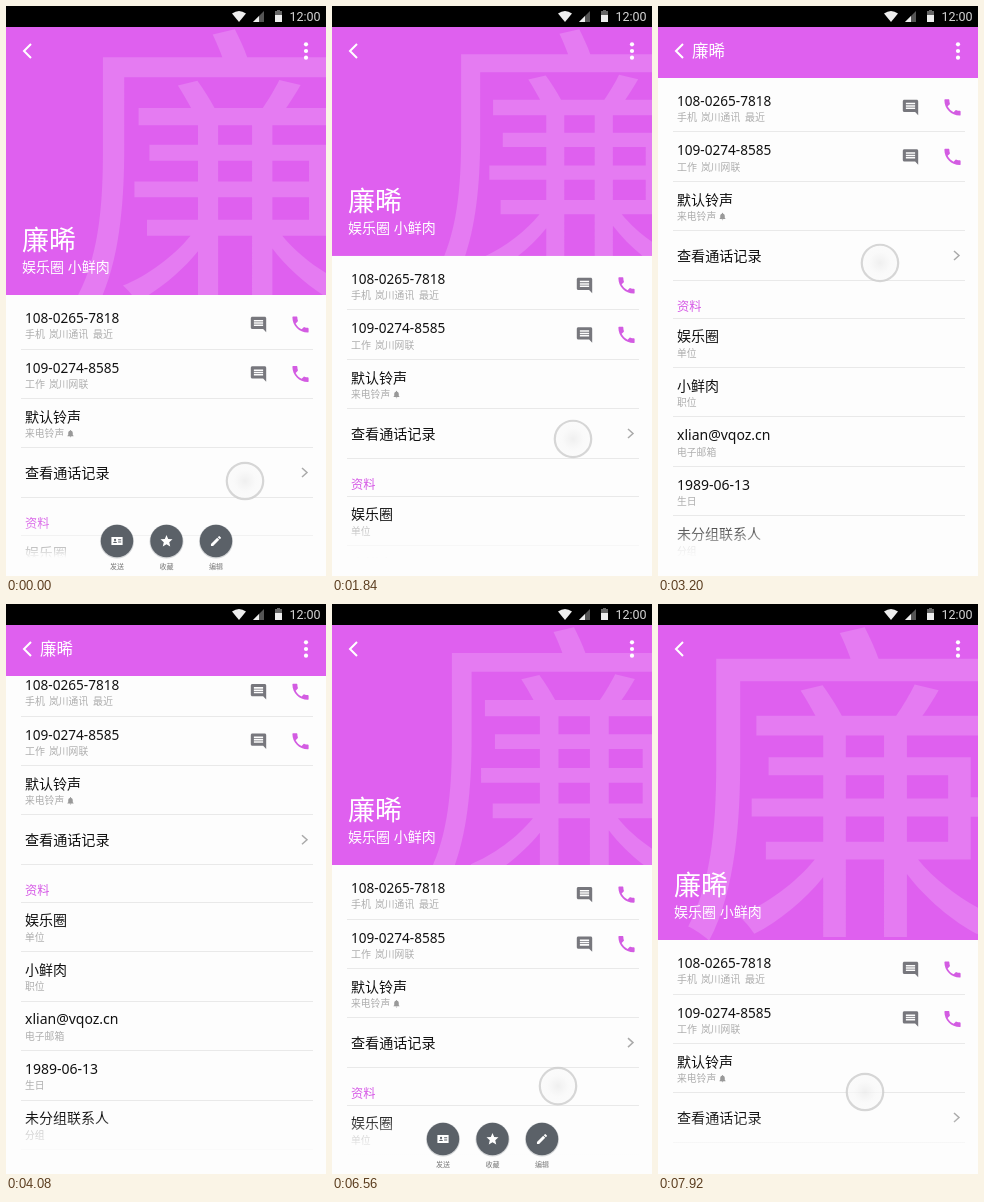
An HTML page with a canvas that plays this animation: 320 by 570 pixels, repeating every 8 s.

```html
<!DOCTYPE html>
<html lang="zh-CN">
<head>
<meta charset="utf-8">
<title>联系人</title>
<style>
html, body { margin: 0; width: 100%; height: 100%; overflow: hidden; background: #fdfdfd; }
canvas { display: block; width: 320px; height: 570px; }
</style>
</head>
<body>
<canvas id="stage"></canvas>
<script>
const W = 320, H = 570, LOOP = 8000;
const PINK = '#df60ef', GREY = '#adadad', INK = '#111';
const FONT = '"Noto Sans", "Noto Sans CJK SC", sans-serif';
const CJK = '"Noto Sans CJK SC", "Noto Sans CJK", sans-serif';

const canvas = document.getElementById('stage');
const ctx = canvas.getContext('2d');
const dpr = window.devicePixelRatio || 1;
canvas.width = W * dpr;
canvas.height = H * dpr;

const clamp = v => Math.max(0, Math.min(1, v));
const ramp = (v, a, b) => clamp((v - a) / (b - a));
const mix = (a, b, p) => a + (b - a) * p;
const smooth = p => p * p * (3 - 2 * p);

// Smooth monotone curve through [time, value] points
function track(keys) {
  const n = keys.length - 1, d = [];
  for (let i = 0; i < n; i++) d.push((keys[i + 1][1] - keys[i][1]) / (keys[i + 1][0] - keys[i][0]));
  const m = keys.map((k, i) => {
    if (i === 0 || i === n || d[i - 1] * d[i] <= 0) return 0;
    return 2 * d[i - 1] * d[i] / (d[i - 1] + d[i]);
  });
  return t => {
    if (t <= keys[0][0]) return keys[0][1];
    if (t >= keys[n][0]) return keys[n][1];
    let i = 0;
    while (t > keys[i + 1][0]) i++;
    const h = keys[i + 1][0] - keys[i][0], u = (t - keys[i][0]) / h, s = smooth(u);
    return mix(keys[i][1], keys[i + 1][1], s) +
      h * u * (1 - u) * ((1 - u) * m[i] - u * m[i + 1]);
  };
}

const edgeAt = track([[1040, 289], [1840, 250], [2400, 199], [3200, 72], [3600, 61], [4240, 58],
  [5200, 58], [5520, 85], [6560, 261], [6880, 289], [7280, 289], [7920, 336]]);

const touches = [
  { from: -500, to: 3900, fade: 260,
    x: track([[1040, 239], [1840, 241], [2400, 241], [3200, 222], [3700, 212]]),
    y: track([[1040, 475], [1840, 433], [2400, 382], [3200, 257], [3700, 238]]) },
  { from: 4380, to: 6880, fade: 160,
    x: track([[5520, 212], [6560, 226], [6880, 229]]),
    y: track([[5200, 259], [5520, 289], [6560, 482], [6880, 512]]) },
  { from: 7260, to: 9000, fade: 160,
    x: () => 207,
    y: track([[7280, 428], [7920, 488]]) }
];

const icons = {
  note: new Path2D('M22 4c0-1.1-.9-2-2-2H4c-1.1 0-2 .9-2 2v12c0 1.1.9 2 2 2h14l4 4zM18 14H6v-2h12zM18 11H6V9h12zM18 8H6V6h12z'),
  call: new Path2D('M6.6 10.8c1.4 2.8 3.8 5.1 6.6 6.6l2.2-2.2c.3-.3.7-.4 1-.2 1.1.4 2.3.6 3.6.6.6 0 1 .4 1 1V20c0 .6-.4 1-1 1C10.600 21 3 13.400 3 4c0-.6.5-1 1-1h3.500c.6 0 1 .5 1 1 0 1.300.2 2.500.6 3.600.1.3 0 .7-.3 1z'),
  bell: new Path2D('M12 22a2 2 0 0 0 2-2h-4a2 2 0 0 0 2 2zM18 16v-5c0-3-1.600-5.600-4.500-6.300V4a1.500 1.500 0 0 0-3 0v.7C7.600 5.400 6 8 6 11v5l-2 2v1h16v-1z'),
  card: new Path2D('M2 5h20v14H2zM5 15.500h7c0-3-7-3-7 0zM8.500 8a2 2 0 1 0 0 4a2 2 0 1 0 0-4zM14 9h5.500v1.800H14zM14 13h5.500v1.800H14z'),
  star: new Path2D('M12 17.300 18.200 21l-1.600-7L22 9.200l-7.200-.6L12 2 9.200 8.600 2 9.200 7.500 14l-1.700 7z'),
  pen: new Path2D('M3 17.200V21h3.800L17.800 9.900l-3.700-3.700zM20.700 7a1 1 0 0 0 0-1.400l-2.300-2.300a1 1 0 0 0-1.400 0l-1.800 1.800 3.700 3.700z')
};

function icon(name, x, y, scale, color) {
  ctx.save();
  ctx.translate(x, y);
  ctx.scale(scale, scale);
  ctx.translate(-12, -12);
  ctx.fillStyle = color;
  ctx.fill(icons[name], 'evenodd');
  ctx.restore();
}

// Text placed by its visual middle
function text(s, x, y, size, color, weight = 400, font = FONT) {
  ctx.font = `${weight} ${size}px ${font}`;
  ctx.fillStyle = color;
  ctx.fillText(s, x, y + size * 0.37);
}

function rect(x, y, w, h, color) {
  ctx.fillStyle = color;
  ctx.fillRect(x, y, w, h);
}

function disc(x, y, r, color) {
  ctx.fillStyle = color;
  ctx.beginPath();
  ctx.arc(x, y, r, 0, 7);
  ctx.fill();
}

function poly(points, color) {
  ctx.fillStyle = color;
  ctx.beginPath();
  points.forEach(p => ctx.lineTo(...p));
  ctx.fill();
}

function chevron(x, y, w, h, color, width) {
  ctx.strokeStyle = color;
  ctx.lineWidth = width;
  ctx.beginPath();
  ctx.moveTo(x - w, y - h);
  ctx.lineTo(x, y);
  ctx.lineTo(x - w, y + h);
  ctx.stroke();
}

const phones = [
  ['108-0265-7818', '手机', '岚川通讯', '最近'],
  ['109-0274-8585', '工作', '岚川网联', '']
];
const details = [
  ['娱乐圈', '单位'], ['小鲜肉', '职位'], ['xlian@vqoz.cn', '电子邮箱'],
  ['1989-06-13', '生日'], ['未分组联系人', '分组']
];

function list(top) {
  const line = y => rect(15, Math.round(top + y), 292, 1, '#e9e9e9');
  phones.forEach(([number, kind, carrier, tag], i) => {
    const y = top + 23 + i * 49.5;
    text(number, 19, y, 13.6, INK, 500);
    text(kind, 19, y + 16.5, 10, GREY);
    text(carrier, 43, y + 16.5, 9.8, GREY);
    text(tag, 87, y + 16.5, 10, GREY);
    icon('note', 252.5, y + 6.5, 0.77, '#77777d');
    icon('call', 294.5, y + 6.5, 0.9, '#d35ce2');
    line(53.5 + i * 49.5);
  });
  text('默认铃声', 19, top + 121.5, 14, INK);
  text('来电铃声', 19, top + 138.5, 9.8, GREY);
  icon('bell', 64.5, top + 138.5, 0.38, '#999');
  line(152);
  text('查看通话记录', 19, top + 177.5, 14.1, INK);
  chevron(301, top + 177.5, 5, 4.5, '#aaa', 1.5);
  line(202);
  text('资料', 19, top + 228.5, 12.2, '#d65ae6');
  line(240);
  details.forEach(([value, label], i) => {
    const y = top + 258 + i * 49.5;
    text(value, 19, y, 14, INK);
    text(label, 19, y + 17, 9.8, GREY);
    line(289 + i * 49.5);
  });
}

function bottomFade() {
  const g = ctx.createLinearGradient(0, 512, 0, 552);
  g.addColorStop(0, 'rgba(253,253,253,0)');
  g.addColorStop(1, 'rgba(253,253,253,1)');
  rect(0, 512, W, 58, g);
}

function header(edge) {
  const bottom = Math.max(72, edge), pull = edge - 289;
  ctx.save();
  ctx.beginPath();
  ctx.rect(0, 21, W, bottom - 21);
  ctx.clip();
  rect(0, 21, W, bottom - 21, PINK);
  const size = 300 + pull * 0.8;
  ctx.globalAlpha = 0.17 * ramp(edge, 95, 240);
  ctx.font = `500 ${size}px ${CJK}`;
  ctx.fillStyle = '#fff';
  ctx.fillText('廉', 72 - pull * 0.89 - size * 0.03, 23 + size * 0.845);
  ctx.globalAlpha = ramp(edge, 110, 180);
  text('娱乐圈 小鲜肉', 16, edge - 28.5, 14, '#fff', 500);
  ctx.globalAlpha = 1;
  const open = smooth(ramp(edge, 96, 180));
  text('廉晞', mix(34, 16, open), Math.max(44.5, edge - 55), mix(16.5, 27, open), '#fff');
  ctx.restore();

  ctx.save();
  ctx.translate(18, 45);
  ctx.scale(-1, 1);
  chevron(0, 0, 7, 7, '#fff', 2);
  ctx.restore();
  for (let i = -1; i < 2; i++) disc(300, 45 + i * 6.7, 2.1, '#fff');
}

function statusBar() {
  rect(0, 0, W, 21, '#000');
  ctx.fillStyle = '#eee';
  ctx.beginPath();
  ctx.moveTo(233, 16);
  ctx.lineTo(226, 7.5);
  ctx.quadraticCurveTo(233, 2.5, 240, 7.5);
  ctx.fill();
  poly([[247, 16], [258, 16], [258, 5]], '#555');
  poly([[247, 16], [253, 16], [253, 10]], '#eee');
  rect(269, 5, 7, 11, '#666');
  rect(271, 4, 3, 1, '#666');
  rect(269, 9, 7, 7, '#eee');
  text('12:00', 283.500, 10.500, 12.500, '#d6d6d6', 400, 'Roboto, sans-serif');
}

function actions(t) {
  const hide = ramp(t, 1040, 1400) - ramp(t, 5560, 5920) + ramp(t, 7280, 7600);
  if (hide >= 1) return;
  ctx.save();
  ctx.globalAlpha = 1 - hide;
  ctx.translate(0, 40 * smooth(hide));
  [['card', '发送'], ['star', '收藏'], ['pen', '编辑']].forEach(([name, label], i) => {
    const x = 111 + i * 49.5;
    disc(x, 535.5, 17, 'rgba(90,96,104,.25)');
    disc(x, 535, 16.2, '#5b6168');
    icon(name, x, 535, i === 1 ? 0.6 : 0.56, '#fff');
    text(label, x - 7, 560.5, 7, '#777');
  });
  ctx.restore();
}

function touch(t) {
  const p = touches.find(k => t >= k.from && t < k.to);
  if (!p) return;
  const x = p.x(t), y = p.y(t);
  ctx.save();
  ctx.globalAlpha = Math.min(clamp((t - p.from) / p.fade), clamp((p.to - t) / p.fade));
  const g = ctx.createRadialGradient(x, y, 0, x, y, 18);
  g.addColorStop(0, 'rgba(236,236,236,.8)');
  g.addColorStop(0.6, 'rgba(248,248,248,.7)');
  g.addColorStop(1, 'rgba(250,250,250,.7)');
  disc(x, y, 18, g);
  ctx.strokeStyle = 'rgba(205,205,205,.8)';
  ctx.lineWidth = 2.2;
  ctx.beginPath();
  ctx.arc(x, y, 18.2, 0, 7);
  ctx.stroke();
  ctx.restore();
}

function draw(t) {
  const edge = edgeAt(t);
  ctx.setTransform(dpr, 0, 0, dpr, 0, 0);
  rect(0, 0, W, H, '#fdfdfd');
  list(edge);
  bottomFade();
  header(edge);
  statusBar();
  actions(t);
  touch(t);
}

const start = performance.now();
function tick() {
  draw((performance.now() - start) % LOOP);
  requestAnimationFrame(tick);
}
tick();
</script>
</body>
</html>
```
